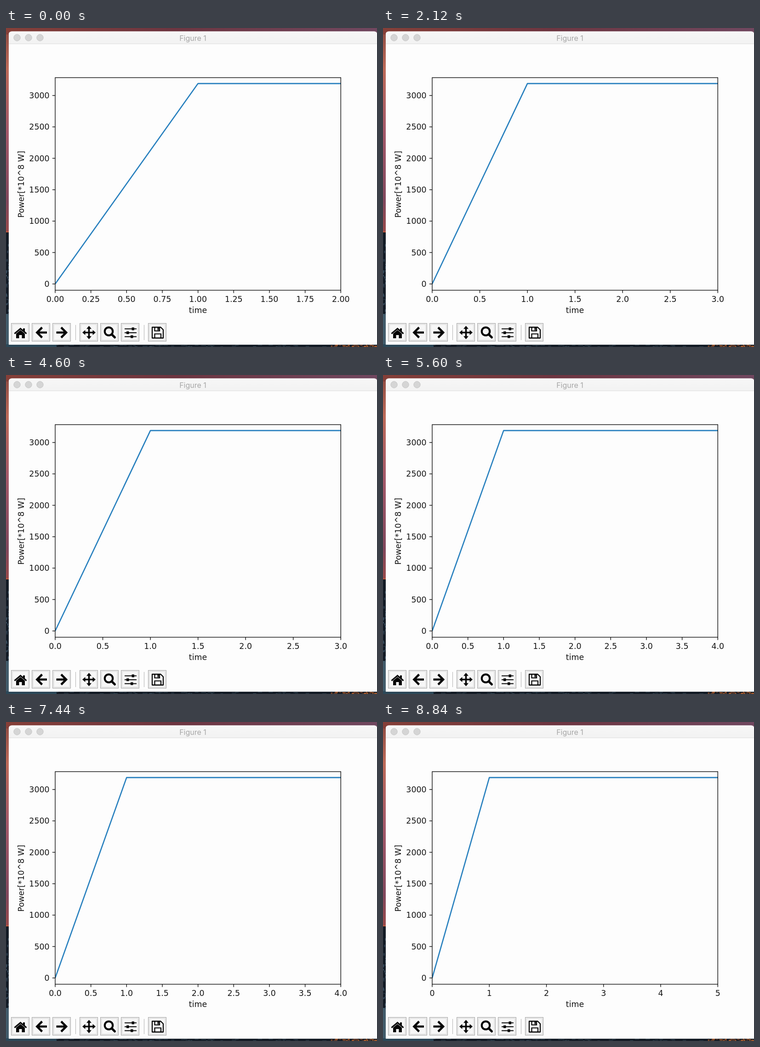
Recreate the animation shown at these times as an HTML page. Size 807 by 694 pixels, loop 8.86 s.

```html
<!DOCTYPE html>
<html lang="en">
<head>
<meta charset="utf-8">
<title>Power plot</title>
<style>
  html, body { margin: 0; width: 100%; height: 100%; overflow: hidden; background: #fdfdfd; }
  svg { display: block; width: 807px; height: 694px; }
  .plot text { font: 17.4px "DejaVu Sans", sans-serif; fill: #161616; }
  .axis { fill: none; stroke: #111; stroke-width: 1.4; }
  .icon { fill: none; stroke: #050505; stroke-width: 4.6; }
  .solid { fill: #050505; stroke: none; }
</style>
</head>
<body>
<svg viewBox="0 0 807 694">
  <defs>
    <linearGradient id="sky" x1="0" y1="0" x2="0" y2="1">
      <stop offset="0" stop-color="#8c4a42"/>
      <stop offset=".2" stop-color="#bd6a58"/>
      <stop offset=".5" stop-color="#a4596a"/>
      <stop offset=".85" stop-color="#81485d"/>
      <stop offset="1" stop-color="#9a4a4a"/>
    </linearGradient>
    <linearGradient id="top">
      <stop offset="0" stop-color="#853f38"/>
      <stop offset=".45" stop-color="#6d3540"/>
      <stop offset="1" stop-color="#70475f"/>
    </linearGradient>
    <linearGradient id="bar" x1="0" y1="0" x2="0" y2="1">
      <stop offset="0" stop-color="#f7f7f7"/>
      <stop offset="1" stop-color="#f2f2f2"/>
    </linearGradient>
    <clipPath id="area"><rect x="107" y="108" width="621.3" height="462.5"/></clipPath>
  </defs>

  <rect width="807" height="694" fill="#141c26"/>
  <rect width="8" height="444" fill="url(#sky)"/>
  <rect width="807" height="14" fill="url(#top)"/>
  <rect y="442.5" width="7" height="2" fill="#d0613f"/>
  <rect y="622" width="7" height="72" fill="#425c6b"/>
  <rect y="688" width="110" height="6" fill="#2c4858"/>
  <g id="specks"></g>

  <path d="M6 689V14Q6 7.5 12.5 7.5H801Q807 7.5 807 13.5V689Z" fill="#fdfdfd"/>
  <path d="M6 35V14Q6 7.5 12.5 7.5H801Q807 7.5 807 13.5V35Z" fill="url(#bar)"/>
  <path d="M6 34.5H807" stroke="#dedede"/>
  <g fill="#d5d5d5" stroke="#c6c6c6">
    <circle cx="24" cy="21" r="7.2"/><circle cx="49" cy="21" r="7.2"/><circle cx="74" cy="21" r="7.2"/>
  </g>
  <text x="406.5" y="27.5" text-anchor="middle" fill="#a6a6a6" font-size="16" font-family="Inter, sans-serif">Figure 1</text>

  <g class="plot">
    <path id="curve" clip-path="url(#area)" fill="none" stroke="#2880be" stroke-width="2.6" stroke-linejoin="round"/>
    <rect class="axis" x="107" y="108" width="621.3" height="462.5"/>
    <g id="yTicks"></g>
    <g id="xTicks"></g>
    <text x="417.5" y="620" text-anchor="middle">time</text>
    <text transform="translate(39 340) rotate(-90)" text-anchor="middle">Power[*10^8 W]</text>
  </g>

  <g id="buttons"></g>
  <path d="M151.5 646V679M300.5 646V679" stroke="#bcbcbc" stroke-width="1.2"/>
  <g class="icon">
    <path class="solid" d="M22 665L31.5 657L41 665V675H34.5V668H28.5V675H22Z"/>
    <path d="M18.5 665L31.5 654L44.5 665" stroke-width="3"/>
    <path class="solid" d="M37 653.5H41V661L37 658Z"/>
    <path d="M89 662.5H69M78.5 651.5L67.5 662.5L78.5 673.5"/>
    <path d="M109.5 662.5H129.5M120 651.5L131 662.5L120 673.5"/>
    <path d="M180.5 653V672M171 662.5H190" stroke-width="3.6"/>
    <path class="solid" d="M180.5 648L186 654.5H175ZM180.5 677L186 670.5H175ZM166 662.5L172.5 657V668ZM195 662.5L188.5 657V668Z"/>
    <circle cx="223.5" cy="660" r="8.7" stroke-width="4.2"/>
    <path d="M230 666.5L236.5 673" stroke-width="5" stroke-linecap="round"/>
    <path d="M258 654.5H284M258 663H284M258 671.5H284" stroke-width="2.2"/>
    <path d="M273.5 654.5H279M262 663H267.5M271 671.5H276.5" stroke-width="6"/>
    <path d="M318 651H336.5L342 656.5V674.5H318Z" stroke-width="2.3" stroke-linejoin="round"/>
    <path d="M323.5 674V665.5H337V674M323.5 651V659H334V651" stroke-width="2.2"/>
    <path d="M331 652V657.5" stroke-width="3"/>
  </g>
</svg>
<script>
const LOOP = 8860;
const LEFT = 107, WIDTH = 621.3, BOTTOM = 570.5;
const ZERO_Y = 556.8, UNIT_Y = 68.33 / 500, PEAK = 3190;

// Each stage widens the time axis in one hard step.
const STAGES = [
  { start: 0, max: 2, step: .25, digits: 2 },
  { start: 2020, max: 3, step: .5, digits: 1 },
  { start: 5280, max: 4, step: .5, digits: 1 },
  { start: 8540, max: 5, step: 1, digits: 0 }
];

const el = id => document.getElementById(id);
const yOf = value => ZERO_Y - value * UNIT_Y;

function tick(path, x, y, anchor, label) {
  return `<path class="axis" d="${path}"/><text x="${x}" y="${y}" text-anchor="${anchor}">${label}</text>`;
}

function drawYTicks() {
  let out = '';
  for (let v = 0; v <= 3000; v += 500) {
    const y = yOf(v);
    out += tick(`M${LEFT} ${y}h-6.1`, 94.6, y + 6.2, 'end', v);
  }
  el('yTicks').innerHTML = out;
}

function drawStage({ max, step, digits }) {
  const xOf = t => LEFT + WIDTH * t / max;
  let out = '';
  for (let t = 0; t <= max; t += step) {
    const x = xOf(t);
    out += tick(`M${x} ${BOTTOM}v6.1`, x, 596.3, 'middle', t.toFixed(digits));
  }
  el('xTicks').innerHTML = out;
  el('curve').setAttribute('d', `M${xOf(0)} ${yOf(0)}L${xOf(1)} ${yOf(PEAK)}H${xOf(max)}`);
}

function drawButtons() {
  el('buttons').innerHTML = [12, 57, 102, 161, 206, 251, 310].map(x =>
    `<rect x="${x - .5}" y="642.5" width="39" height="39" fill="#e6e6e6" stroke="#a9a9a9"/>` +
    `<rect x="${x + 3}" y="646" width="32" height="32" fill="#f7f7f7"/>`).join('');
}

function drawSpecks() {
  let seed = 11, out = '';
  const rnd = () => (seed = seed * 16807 % 2147483647) / 2147483647;
  const speck = (x, y, w, h, fill) => out += `<rect x="${x}" y="${y}" width="${w}" height="${h}" fill="${fill}"/>`;
  for (let i = 0; i < 24; i++) speck(rnd() * 5, 470 + rnd() * 150, 2, 2 + rnd() * 5, '#35495a');
  for (let i = 0; i < 50; i++) speck(110 + rnd() * 590, 689 + rnd() * 4, 3 + rnd() * 8, 1.5, '#2b3b47');
  for (let i = 0; i < 45; i++) speck(705 + rnd() * 100, 689 + rnd() * 4, 2 + rnd() * 4, 2, i % 2 ? '#a65a2c' : '#613c2c');
  el('specks').innerHTML = out;
}

let shown;
function render(time) {
  const stage = STAGES.filter(s => s.start <= time % LOOP).pop();
  if (stage !== shown) drawStage(shown = stage);
}

drawYTicks();
drawButtons();
drawSpecks();
render(0);
const origin = performance.now();
(function frame() {
  render(performance.now() - origin);
  requestAnimationFrame(frame);
})();
</script>
</body>
</html>
```
